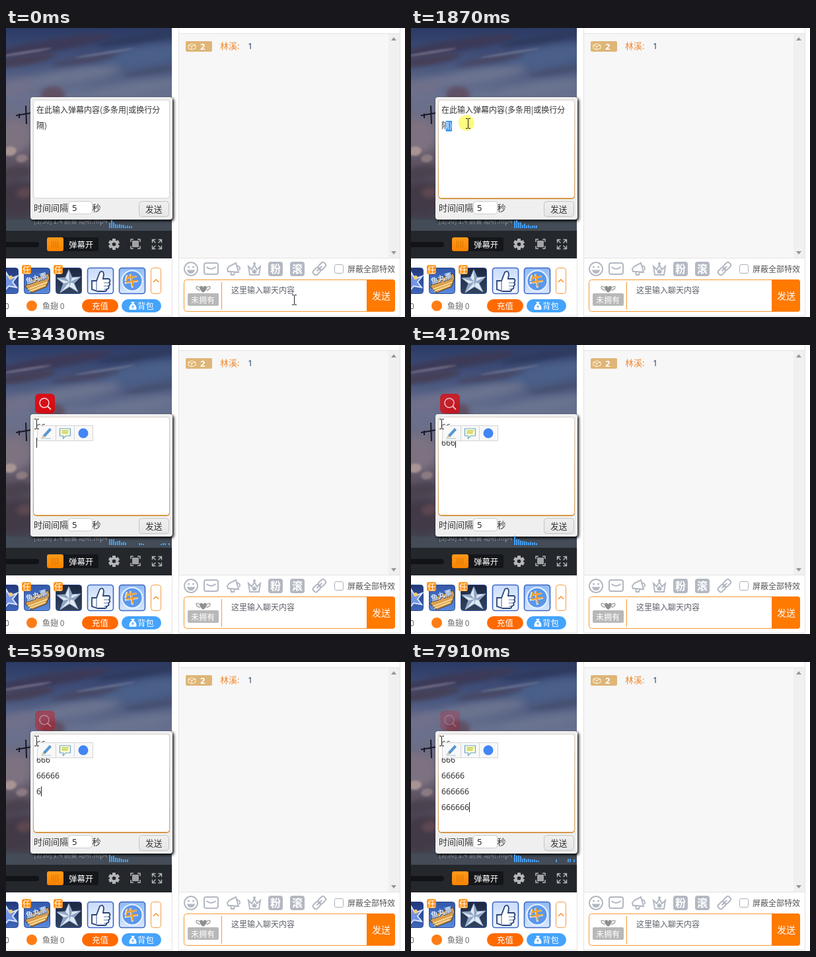
These frames come from a looping animation (604 by 439 pixels, 7.99 s). An HTML page with a canvas:

```html
<!DOCTYPE html>
<html lang="zh">
<head>
<meta charset="utf-8">
<title>弹幕发送</title>
<style>
html, body { margin: 0; width: 100%; height: 100%; overflow: hidden; background: #fff; }
canvas { display: block; width: 604px; height: 439px; }
</style>
</head>
<body>
<canvas id="stage" width="604" height="439"></canvas>
<script>
const W = 604, H = 439, LOOP = 7990, STEP = 77.5;
const CJK = '"Noto Sans CJK SC", "Noto Sans CJK", sans-serif';
const LATIN = '"Noto Sans", "Noto Sans CJK SC", "Noto Sans CJK", sans-serif';
const ORANGE = '#ff7a00', ICON = '#b3b8c2', INK = '#333';
const screen = document.getElementById('stage').getContext('2d');
const base = document.createElement('canvas');
base.width = W;
base.height = H;
let c = base.getContext('2d');

const clamp = v => Math.max(0, Math.min(1, v));
const ease = v => v * v * (3 - 2 * v);
const noise = n => { const s = Math.sin(n * 127.1 + 31.7) * 43758.5453; return s - Math.floor(s); };

function rect(x, y, w, h, fill) {
  c.fillStyle = fill;
  c.fillRect(x, y, w, h);
}
function box(x, y, w, h, r, fill, stroke, lw = 1) {
  c.beginPath();
  c.roundRect(x, y, w, h, r);
  if (fill) { c.fillStyle = fill; c.fill(); }
  if (stroke) { c.strokeStyle = stroke; c.lineWidth = lw; c.stroke(); }
}
function disc(x, y, r, fill, stroke, lw = 1) {
  c.beginPath();
  c.arc(x, y, r, 0, 7);
  if (fill) { c.fillStyle = fill; c.fill(); }
  if (stroke) { c.strokeStyle = stroke; c.lineWidth = lw; c.stroke(); }
}
// Strokes or fills an SVG path string with its origin at x, y.
function path(d, x, y, { fill, stroke, lw = 1 }) {
  c.save();
  c.translate(x, y);
  const p = new Path2D(d);
  if (fill) { c.fillStyle = fill; c.fill(p); }
  if (stroke) { c.strokeStyle = stroke; c.lineWidth = lw; c.stroke(p); }
  c.restore();
}
function text(s, x, y, size, fill, font = CJK, weight = 400) {
  c.font = `${weight} ${size}px ${font}`;
  c.fillStyle = fill;
  c.fillText(s, x, y);
}
function turned(s, x, y, size, fill, angle, weight) {
  c.save();
  c.translate(x, y);
  c.rotate(angle);
  text(s, 0, 0, size, fill, CJK, weight);
  c.restore();
}
function ramp(y0, y1, ...colors) {
  const g = c.createLinearGradient(0, y0, 0, y1);
  colors.forEach((color, i) => g.addColorStop(i / (colors.length - 1), color));
  return g;
}
function cloud(x, y, rx, ry, color, tilt = -0.16) {
  c.fillStyle = color;
  c.beginPath();
  c.ellipse(x, y, rx, ry, tilt, 0, 7);
  c.fill();
}

function drawSky() {
  c.save();
  c.beginPath();
  c.rect(0, 0, 251, 308);
  c.clip();
  rect(0, 0, 251, 308, ramp(0, 308, '#2b3a64', '#46547d', '#68718f', '#706c80', '#5d5363', '#433e4c', '#434c57'));
  c.filter = 'blur(6px)';
  cloud(215, 42, 70, 16, '#4a6089');
  cloud(95, 74, 80, 11, '#6c748f');
  cloud(200, 92, 70, 9, '#6b7590');
  cloud(12, 92, 34, 14, '#70708a');
  cloud(10, 165, 28, 26, '#7d7280');
  cloud(16, 262, 34, 26, '#433a47');
  c.filter = 'blur(3px)';
  cloud(70, 26, 90, 9, '#3c3a58');
  cloud(25, 49, 50, 8, '#454058');
  cloud(200, 16, 64, 6, '#2f3a5e');
  cloud(120, 48, 52, 5, '#484864');
  cloud(222, 65, 44, 5, '#465070');
  cloud(71, 101, 18, 12, '#5f5064', 0);
  cloud(15, 220, 24, 10, '#4a424e');
  cloud(28, 250, 12, 8, '#5d4850');
  c.filter = 'blur(1.5px)';
  cloud(30, 37, 40, 1.8, '#746d86');
  cloud(150, 38, 46, 1.6, '#6a7290');
  cloud(6, 187, 10, 7, '#a99494');
  cloud(24, 198, 9, 6, '#8c7a80');
  c.filter = 'none';
  path('M15 133L38 129M30 118L31 146M20 130V137', 0, 0, { stroke: '#191a25', lw: 2 });
  rect(0, 291, 251, 17, '#434c57');
  text('[3/30] 1.4 前奏 动听.mp4', 42, 297, 10, '#a0a3ad');
  c.restore();
}

function drawControls() {
  rect(0, 308, 251, 42, '#24272c');
  box(-8, 325, 58, 8, 4, '#111317');
  box(62, 318, 78, 21, 3, '#14161a');
  box(62, 318, 25, 21, 3, ramp(318, 339, '#ff9a1a', '#fa8200'));
  for (let x = 69; x <= 79; x += 3) rect(x, 323, 1, 11, '#d97700');
  text('弹幕开', 95, 333.5, 12.4, '#fff');
  c.save();
  c.translate(163.5, 328.5);
  for (let i = 0; i < 6; i++) {
    rect(-2.5, -8.5, 5, 5, '#b5b6b8');
    c.rotate(Math.PI / 3);
  }
  c.restore();
  disc(163.5, 328.5, 4.6, null, '#b5b6b8', 3.6);
  path('M-7 -3V-7H-3M3 -7H7V-3M7 3V7H3M-3 7H-7V3', 196, 328, { stroke: '#b5b6b8', lw: 1.5 });
  rect(191, 323, 10, 10, '#a0a2a5');
  path('M-7 -2V-7H-2M-7 -7L-2 -2M2 -7H7V-2M7 -7L2 -2M7 2V7H2M7 7L2 2M-2 7H-7V2M-7 7L-2 2', 228.5, 328.5,
    { stroke: '#b5b6b8', lw: 1.4 });
}

function drawGifts() {
  const tiles = [['#22367a', '#4068bd'], ['#3156a8', '#5a8be0'], ['#1c2740', '#33445f'], ['#c8dbfa', '#f2f7ff'], ['#8db9f5', '#d9e9ff']];
  tiles.forEach((colors, i) => {
    box(i * 48 - 20.5, 364.5, 39, 39, 4, ramp(364, 404, ...colors), i < 3 ? '#2f4c8f' : '#3f66c4', i < 3 ? 1 : 1.6);
  });
  path('M-2 -14L4 -4L15 -8L8 1L14 9L2 7L-4 14Z', 2, 385, { fill: '#7594e3', stroke: '#d5e5ff', lw: 2 });
  disc(7, 379, 3, '#f5cc72');

  path('M-18 8L-10 -2L17 -12L19 -5L14 8L-8 17Z', 47, 385, { fill: '#d9a04e', stroke: '#5a4630', lw: 1.2 });
  path('M-14 12L16 1M-12 15L12 6', 47, 385, { stroke: '#ffe2a0', lw: 1.5 });
  turned('鱼丸票', 32, 390, 11, '#1d3f92', -.3, 900);
  turned('鱼丸票', 31.5, 389, 11, '#dff0ff', -.3, 700);

  path('M0 -17L5 -5L18 -6L8 4L14 17L1 9L-13 18L-8 4L-18 -4L-5 -5Z', 95, 384, { fill: '#dfe8f4', stroke: '#8fa9c9', lw: 1 });
  path('M0 -17L1 9L5 -5ZM18 -6L1 2L8 4ZM-18 -4L1 2L-5 -5ZM-13 18L1 2L-8 4Z', 95, 384, { fill: '#8ea5c3' });

  path('M-13 0H-6L-1 -13Q4 -17 5 -10L4 -3H13Q16 0 13 3Q16 6 12 8Q14 12 9 13Q10 16 6 16H-4L-13 13Z',
    143, 384, { fill: '#fff', stroke: '#2b4378', lw: 1.8 });
  path('M5 3H13M5 8H12M5 13H9M-6 1V14', 143, 384, { stroke: '#5a73a8', lw: 1.2 });

  disc(191, 384, 15.5, '#5b97ec', '#e9f3ff', 2);
  turned('牛', 180, 394, 22, '#fff', -.15, 900);
  turned('牛', 181.5, 392.5, 20, '#f0a030', -.15, 700);

  for (const x of [24, 72]) {
    box(x, 360, 14, 14, 3, '#ff9419');
    text('任', x + 1, 371.5, 12, '#fff');
  }
  box(219.5, 364.5, 15, 39, 4, '#fff', '#f39a43');
  path('M-4 2L0 -2L4 2', 227, 384, { stroke: ORANGE, lw: 1.2 });
}

function drawWallet() {
  text('0', -2, 427, 12, '#666', LATIN);
  disc(39, 422, 8, '#ff7d16');
  text('鱼翅 0', 55, 427, 12, '#666');
  box(115, 412, 55, 20, 10, '#ff6a00');
  text('充值', 130, 426.5, 12.4, '#fff', CJK, 500);
  box(175, 412, 60, 20, 10, '#45a3fb');
  path('M-2 -3Q-7 1 -5 6H5Q7 1 2 -3ZM-3 -6H3L1 -3H-1Z', 192, 422, { fill: '#fff' });
  path('M-2 1H2M0 -1V4', 192, 422, { stroke: '#45a3fb', lw: 1 });
  text('背包', 199, 426.5, 12.4, '#fff', CJK, 500);
}

function drawChatTools() {
  disc(280, 366, 10, null, ICON, 2);
  disc(276.5, 363, 1.5, ICON);
  disc(283.5, 363, 1.5, ICON);
  path('M-6 1Q0 2 6 1Q5 7 0 7Q-5 7 -6 1Z', 280, 366, { fill: ICON });
  box(300, 357, 21, 17, 3, null, ICON, 2);
  path('M-7 -2Q0 4 7 -2', 310.5, 365, { stroke: ICON, lw: 2 });
  path('M-9 0L-6 -4L4 -9L8 5L-3 4L-8 4ZM-4 4L-3 9H1L2 5M6 -5Q12 -3 9 2', 344, 366, { stroke: ICON, lw: 2 });
  path('M-9 -5L-4 0L0 -7L4 0L9 -5L7 8H-7Z', 376, 367, { stroke: ICON, lw: 2 });
  path('M-4 3L0 -1L4 3L2 6H-2Z', 376, 367, { fill: ICON });
  disc(376, 358, 2, ICON);
  for (const [glyph, x] of [['粉', 397], ['滚', 430]]) {
    box(x, 355, 22, 22, 4, ICON);
    text(glyph, x + 3, 372, 16, '#fff', CJK, 700);
  }
  c.save();
  c.translate(474, 366);
  c.rotate(-.78);
  box(-11, -4, 12, 8, 3, null, ICON, 2);
  box(0, -4, 12, 8, 3, null, ICON, 2);
  rect(-5, -1, 11, 2, ICON);
  c.restore();
  box(497.5, 359.5, 13, 13, 2, '#fff', '#aab0bb');
  text('屏蔽全部特效', 517, 371, 12, '#555');
}

function drawChat() {
  rect(261, 0, 336, 438, '#e3e3e3');
  rect(262, 0, 334, 8, '#fff');
  rect(262, 9, 334, 340, '#f7f7f7');
  rect(579, 9, 17, 340, '#f0f0f0');
  path('M-4 2L0 -3L4 2Z', 587, 17, { fill: '#969696' });
  path('M-4 -2L0 3L4 -2Z', 587, 341, { fill: '#969696' });
  rect(262, 350, 334, 87, '#fff');
  box(272, 20, 40, 16, 2, '#dfb578');
  path('M-5 -2L0 -4L6 -2V3L0 5L-5 3ZM-5 -2L0 0L6 -2M0 0V5', 281, 28, { stroke: '#fff4d8' });
  text('2', 294, 33, 13, '#fff', LATIN, 600);
  text('林溪:', 324, 32, 13, '#f2892f');
  text('1', 366, 32, 13, '#25456e', LATIN);
  drawChatTools();
  box(269.5, 382.5, 319, 48, 4, '#fff', '#f29a32');
  box(546, 382, 43, 49, [0, 4, 4, 0], ORANGE);
  text('发送', 554, 412, 14, '#fff');
  rect(326, 386, 1, 42, '#f29a32');
  path('M0 7Q-7 2 -5 -2Q-2 -5 0 -1Q2 -5 5 -2Q7 2 0 7Z', 298.5, 395, { fill: '#8f8f8f' });
  path('M-5 -1Q-12 -5 -10 1L-5 4M5 -1Q12 -5 10 1L5 4', 298.5, 395, { stroke: '#a9a9a9', lw: 1.5 });
  box(275, 403, 47, 19, 2, '#b8b8b8');
  text('未拥有', 280, 417.5, 12, '#fff');
  text('这里输入聊天内容', 341, 403, 12, '#5d6069');
}

function drawPanel() {
  c.save();
  c.shadowColor = '#000';
  c.shadowBlur = 4;
  c.shadowOffsetX = c.shadowOffsetY = 2;
  box(37, 105, 215, 186, 4, '#efefef');
  c.restore();
  text('时间间隔', 42, 278, 13, INK);
  box(94.5, 263.5, 36, 19, 4, '#fff', '#ccc');
  text('5', 100, 278, 13, '#222', LATIN);
  text('秒', 130.5, 278, 13, INK);
  box(201.5, 263.5, 45, 23, 4, ramp(263, 287, '#f0f0f0', '#e6e6e6'), '#c4c4c4');
  text('发送', 211, 280, 12.7, INK);
}

function drawBase() {
  rect(0, 0, W, H, '#fff');
  drawSky();
  drawControls();
  drawGifts();
  drawWallet();
  rect(251, 308, 1, 130, '#e3e3e3');
  rect(0, 437, 251, 1, '#e3e3e3');
  drawChat();
  drawPanel();
}

function drawBars(t) {
  const n = Math.floor(t / STEP);
  const reach = 8 + 4 * noise(n + 400);
  const sparse = noise(Math.floor(n / 4)) > .45;
  for (let i = 0; i < 31; i++) {
    const r = noise(n * 37 + i);
    const h = i < reach ? 2 + 12 * Math.exp(-i / 6) * (.4 + .6 * r) : sparse && r > .62 ? 2 + 3 * noise(i + n) : 0;
    rect(156 + i * 3, 304 - Math.round(h), 2, Math.round(h), '#469cee');
  }
}

// Each line: time of its caret, then the first key, key interval and key count.
const LINES = [[3030, 3030, 190, 2], [3420, 3600, 150, 3], [4300, 4500, 150, 5], [5300, 5450, 158, 6], [6750, 6950, 146, 6]];
const PRESS = 800, DRAG = 1680, DROP = 2250, POPUP = 2580, TYPE = 3030;
const PROMPT = ['在此输入弹幕内容(多条用|或换行分', '隔)'];
const lineY = i => 129 + i * 24;

function drawPrompt(t) {
  PROMPT.forEach((s, i) => text(s, 46, lineY(i), 12, INK));
  const k = ease(clamp((t - DRAG) / (DROP - DRAG)));
  if (k <= 0) return;
  c.save();
  c.beginPath();
  if (k < .45) c.rect(62 - 16 * k / .45, 141, 16 * k / .45, 16);
  else {
    const left = 97 - 51 * k;
    c.rect(left, 116, 237 - left, 16);
    c.rect(46, 140, 16, 16);
  }
  c.clip();
  rect(41, 109, 207, 60, '#3595f5');
  PROMPT.forEach((s, i) => text(s, 46, lineY(i), 12, '#fff'));
  c.restore();
}

function drawTyped(t) {
  let last = TYPE, row = 0, count = 0;
  LINES.forEach(([open, first, gap, total], i) => {
    if (t < open) return;
    row = i;
    count = t < first ? 0 : Math.min(total, Math.floor((t - first) / gap) + 1);
    last = count ? first + (count - 1) * gap : open;
    text('6'.repeat(count), 46, lineY(i), 12.25, INK, LATIN);
  });
  if ((t - last) % 1060 < 530) rect(Math.round(46 + count * 7), lineY(row) - 12, 1, 15, '#222');
}

function drawEditor(t) {
  const focus = clamp((t - PRESS) / 800);
  box(41.5, 109.5, 206, 149, 4, '#fff', '#d4d4d4');
  if (focus) {
    const orange = clamp((focus - .35) / .65);
    const mix = (a, b) => Math.round(a + (b - a) * orange);
    const edge = `rgb(${mix(150, 214)},${mix(150, 150)},${mix(150, 70)})`;
    c.save();
    c.globalAlpha = clamp(focus * 4);
    box(41.5, 109.5, 206, 149, 4, '#fff', ramp(109, 259, '#d8cfc6', edge));
    path('M42 256Q42 259.5 46 259.5H243Q247.5 259.5 247.5 256', 0, 0, { stroke: edge });
    c.restore();
  }
  if (t < TYPE) drawPrompt(t);
  else drawTyped(t);
}

function drawPopups(t) {
  if (t < POPUP) return;
  c.save();
  c.globalAlpha = 1 - .8 * clamp((t - 2850) / 3500);
  box(44, 74, 30, 30, 6, '#e90006');
  disc(58, 88, 7, null, '#fff', 1.5);
  path('M5 5L10 10', 58, 88, { stroke: '#fff', lw: 1.8 });
  c.restore();
  for (let i = 0; i < 3; i++) box(47.5 + i * 28, 122.5, 28, 23, 0, '#f8f8f8', '#d4d4d4');
  path('M-5 3L5 -8L8 -5L-2 6Z', 61, 134, { fill: '#5797d2' });
  path('M-7 7L-5 3L-2 6Z', 61, 134, { fill: '#e3b674' });
  path('M-8 8H7', 61, 134, { stroke: '#9fc0dc' });
  path('M-8 -7H8V4H1L-3 8V4H-8Z', 89.5, 134, { fill: '#fbfbd0', stroke: '#69a5cf', lw: 1.2 });
  path('M-5 -3.5H5M-5 -.5H4', 89.5, 134, { stroke: '#b4c02c', lw: 1.5 });
  disc(117, 134, 7.5, '#4285f4');
}

function drawPointer(t) {
  const m = ease(clamp((t - 120) / 630)), d = ease(clamp((t - DRAG) / (DROP - DRAG)));
  const x = 436 - 336 * m - 54 * d;
  const y = 413 - 259 * m - 34 * d - 24 * Math.sin(Math.PI * m);
  if (t >= PRESS && t < 2420) {
    c.save();
    c.globalCompositeOperation = 'multiply';
    disc(x - 2, y - 1, 12, '#fffa80');
    c.restore();
  }
  const overText = (x < 248 && y > 109 && y < 259) || (x > 328 && x < 546 && y > 382);
  if (overText) {
    const beam = 'M-3 -7.5H0M1 -7.5H4M.5 -7V7M-3 7.5H0M1 7.5H4';
    path(beam, Math.round(x), Math.round(y), { stroke: '#222', lw: 1 });
  } else {
    path('M0 0V16L4 12.5L7 18.5L9.5 17.3L6.7 11.5H12Z', x, y, { fill: '#fff', stroke: '#111' });
  }
}

function frame(now) {
  const t = now % LOOP;
  c.drawImage(base, 0, 0);
  drawBars(t);
  drawEditor(t);
  drawPopups(t);
  drawPointer(t);
  requestAnimationFrame(() => frame(performance.now() - start));
}

drawBase();
c = screen;
const start = performance.now();
frame(0);
</script>
</body>
</html>
```
